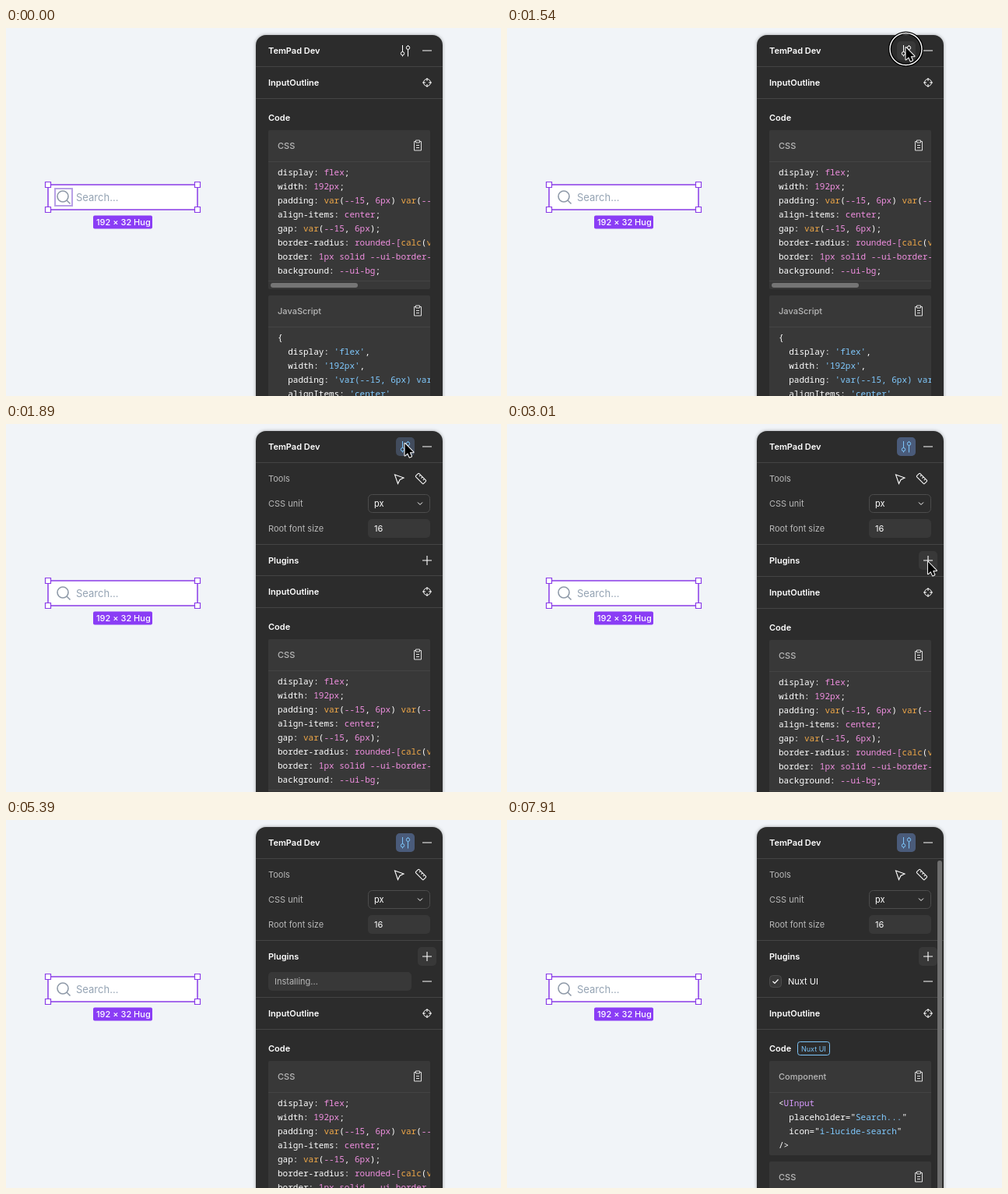
An HTML page with a canvas that plays this animation: 636 px wide and 472 px high, repeating every 8000 ms.

```html
<!DOCTYPE html>
<html lang="en">
<head>
<meta charset="utf-8">
<title>Plugin install</title>
<style>
html, body { margin: 0; width: 636px; height: 472px; overflow: hidden; background: #f1f4f8; }
canvas { display: block; }
</style>
</head>
<body>
<canvas id="stage" width="636" height="472"></canvas>
<script>
const ctx = document.getElementById('stage').getContext('2d');
const LOOP = 8000, STEP = 70;
const PANEL = '#2c2c2c', FIELD = '#383838', LINE = '#444', BLUE = '#7cc4f8', PURPLE = '#8a3ce8';
const MUTED = '#b8b8b8';

// Colour markers inside code lines
const INK = { '|': '#fff', '~': '#f08fe0', '^': '#f0a848', '$': '#80caff', '#': '#d99bff' };

const CSS_CODE = [
  'display: ~flex|;',
  'width: ~192px|;',
  'padding: ^var|(~--15|, ~6px|) ^var|(~--15|, ~6px|);',
  'align-items: ~center|;',
  'gap: ^var|(~--15|, ~6px|);',
  'border-radius: ~rounded-[^calc|(^var|(~--ui-radius|));',
  'border: ~1px solid --ui-border-accented|;',
  'background: ~--ui-bg|;'
];
const JS_CODE = [
  '{',
  "  display: $'flex'|,",
  "  width: $'192px'|,",
  "  padding: $'var(--15, 6px) var(--15, 6px)'|,",
  "  alignItems: $'center'|,"
];
const COMPONENT_CODE = ['<#UInput', '  placeholder="$Search...|"', '  icon="$i-lucide-search|"', '/>'];

const progress = (t, from, to) => Math.min(1, Math.max(0, (t - from) / (to - from)));
const ease = p => (1 - Math.cos(Math.PI * p)) / 2;
const mix = (a, b, p) => a + (b - a) * p;

function text(str, x, y, color = '#fff', weight = 400, size = 11) {
  ctx.font = `${weight} ${size}px Inter, sans-serif`;
  ctx.fillStyle = color;
  ctx.fillText(str, x, y);
}

function box(x, y, w, h, r, fill, stroke, width = 1) {
  ctx.beginPath();
  ctx.roundRect(x, y, w, h, r);
  if (fill) { ctx.fillStyle = fill; ctx.fill(); }
  if (stroke) { ctx.strokeStyle = stroke; ctx.lineWidth = width; ctx.stroke(); }
}

function path(d, color = '#fff', width = 1, x = 0, y = 0) {
  ctx.save();
  ctx.translate(x, y);
  ctx.strokeStyle = color;
  ctx.lineWidth = width;
  ctx.stroke(new Path2D(d));
  ctx.restore();
}

function circle(x, y, r, color, width = 1) {
  ctx.beginPath();
  ctx.arc(x, y, r, 0, 7);
  ctx.strokeStyle = color;
  ctx.lineWidth = width;
  ctx.stroke();
}

const rule = y => path(`M321 ${y + .5}H561`, LINE);
const minus = y => path(`M535 ${y + .5}H547`);

function codeLine(line, x, y) {
  ctx.font = '11px "Noto Sans Mono", "DejaVu Sans Mono", monospace';
  ctx.fillStyle = '#fff';
  for (const part of line.split(/(?=[|~^$#])/)) {
    const color = INK[part[0]];
    if (color) ctx.fillStyle = color;
    const run = color ? part.slice(1) : part;
    ctx.fillText(run, x, y);
    x += ctx.measureText(run).width;
  }
}

function card(title, lines, y, height) {
  ctx.save();
  ctx.beginPath();
  ctx.roundRect(337, y, 208, height, 2);
  ctx.clip();
  box(337, y, 208, height, 0, FIELD);
  text(title, 349, y + 24, MUTED, 500);
  path('M-2 -5H-4.5V6.5H4.5V-5H2M-2.5 -6.5H2.5V-3.5H-2.5ZM-2 0H2M-2 3H2', '#ddd', 1, 529, y + 19.5);
  path(`M337 ${y + 40.5}H545`, LINE);
  lines.forEach((line, i) => codeLine(line, 349, y + 58 + i * 18));
  ctx.restore();
}

function cssCards(y) {
  card('CSS', CSS_CODE, y, 204);
  path(`M337 ${y + 193.5}H545`, LINE);
  box(340, y + 196, 112, 6, 3, '#757575');
  card('JavaScript', JS_CODE, y + 212, 204);
}

function drawSelection(hovered) {
  box(54, 201, 192, 32, 0, '#fff', PURPLE, 1.5);
  circle(73, 216, 7, '#8e99a8', 1.6);
  path('M78 221L82.5 225.5', '#8e99a8', 1.6);
  if (hovered) box(63, 206, 22, 22, 0, null, '#b8a0e6', 2);
  text('Search...', 90, 222, '#94a3b3', 400, 13);
  for (const x of [54, 246]) for (const y of [201, 233]) box(x - 3.5, y - 3.5, 7, 7, 0, '#fff', PURPLE, 1.2);
  box(112, 240.5, 76, 17, 2, '#8a3df5');
  text('192 × 32 Hug', 116, 253, '#fff', 500);
}

function drawHeader(t) {
  text('TemPad Dev', 337, 33, '#fff', 600);
  const on = progress(t, 1800, 1960);
  if (t >= 1400) box(501, 17, 24, 24, 5, FIELD);
  ctx.globalAlpha = on;
  box(501, 17, 24, 24, 5, '#4a5b7a');
  ctx.globalAlpha = 1;
  const color = on ? BLUE : '#fff';
  path('M509.5 22V30.5M509.5 35V36.5M516.5 22V23M516.5 27.5V36.5', color);
  circle(509.5, 32.7, 2.2, color);
  circle(516.5, 25.3, 2.2, color);
  minus(28.5);
  rule(49);
}

function drawPluginRow(t) {
  if (t >= 7770) {
    box(337.5, 199.5, 15, 15, 4, FIELD, '#4c4c4c');
    path('M341.5 207L344 209.5L348.5 204.5', '#fff', 1.2);
    text('Nuxt UI', 361, 211);
  } else if (t >= 5320) {
    box(337, 195, 184, 24, 5, FIELD);
    text('Installing...', 345, 211, MUTED);
  } else {
    box(337.5, 195.5, 183, 23, 5, FIELD, '#3f94d6', 1.2);
    const typed = '@nuxt'.slice(0, [4060, 4340, 4550, 4690, 4970].filter(k => t >= k).length);
    text(typed, 345, 211);
    if (t < 3850 || t >= 4060) box(345 + ctx.measureText(typed).width, 200, 1, 14, 0, '#fff');
  }
  minus(206.5);
}

function drawSettings(t) {
  text('Tools', 337, 74, MUTED);
  path('M499.5 65L511 69L506 71.5L503.5 76.5Z', '#fff', 1.1);
  ctx.save();
  ctx.translate(533, 70);
  ctx.rotate(Math.PI / 4);
  box(-7, -3, 14, 6, 1, null, '#fff');
  path('M-3.5 -3V-.5M0 -3V-.5M3.5 -3V-.5');
  ctx.restore();
  text('CSS unit', 337, 106, MUTED);
  box(465.5, 90.5, 79, 23, 5, null, '#4c4c4c');
  text('px', 473, 106);
  path('M529 100.5L532 103.5L535 100.5');
  text('Root font size', 337, 138, MUTED);
  box(465, 122, 80, 24, 5, FIELD);
  text('16', 473, 138);
  rule(154);
  text('Plugins', 337, 179, '#fff', 600);
  if (t >= 2870) box(529, 163, 24, 24, 5, FIELD);
  path('M535 175H547M541 169V181', '#fff', 1.1);
  if (t >= 3220) drawPluginRow(t);
}

function drawInspector(t, shift) {
  box(321, 49 + shift, 240, 500, 0, PANEL);
  rule(49 + shift);
  text('InputOutline', 337, 74 + shift, '#fff', 600);
  circle(541, 70 + shift, 4.5, '#fff');
  path('M535 0H539M543 0H547M541 -6V-2M541 2V6', '#fff', 1, 0, 70 + shift);
  rule(90 + shift);
  text('Code', 337, 119 + shift, '#fff', 600);
  const top = 131 + shift;
  if (t < 7770) return cssCards(top);
  box(373.5, 284.5, 41, 17, 3, null, BLUE);
  text('Nuxt UI', 378, 296.5, BLUE, 400, 9);
  card('Component', COMPONENT_CODE, top, 121);
  cssCards(top + 129);
}

function drawPanel(t) {
  const shift = Math.round(146 * ease(progress(t, 1680, 1900)) + 32 * ease(progress(t, 3220, 3350)));
  ctx.save();
  ctx.shadowColor = 'rgba(0,0,0,.35)';
  ctx.shadowBlur = 4;
  box(321, 9, 240, 500, 13, PANEL);
  ctx.restore();
  ctx.save();
  ctx.beginPath();
  ctx.roundRect(321, 9, 240, 500, 13);
  ctx.clip();
  if (shift) drawSettings(t);
  drawInspector(t, shift);
  drawHeader(t);
  ctx.globalAlpha = progress(t, 7700, 7910);
  box(553, 52, 6, 440, 3, '#6e6e6e');
  ctx.restore();
}

function drawPointer(t) {
  if (t < 700 || t >= 4060) return;
  const enter = ease(progress(t, 630, 1470)), down = ease(progress(t, 2310, 3080));
  const x = mix(mix(622, 512.5, enter), 541.5, down);
  const y = mix(mix(215, 25, enter), 180, down);
  if ((t >= 1540 && t < 1680) || (t >= 3220 && t < 3360)) {
    circle(x, y + 2, 20.5, '#000', 4);
    circle(x, y + 2, 20.5, '#fff', 1.4);
  }
  ctx.save();
  ctx.translate(x, y);
  const arrow = new Path2D('M0 0V15.5L3.6 12.2L6 17.6L8.5 16.5L6.2 11.2H11Z');
  ctx.lineJoin = 'round';
  ctx.strokeStyle = '#fff';
  ctx.lineWidth = 2;
  ctx.stroke(arrow);
  ctx.fillStyle = '#000';
  ctx.fill(arrow);
  ctx.restore();
}

function draw() {
  const t = Math.floor(performance.now() % LOOP / STEP) * STEP;
  ctx.fillStyle = '#f1f4f8';
  ctx.fillRect(0, 0, 636, 472);
  drawSelection(t < 700);
  drawPanel(t);
  drawPointer(t);
  requestAnimationFrame(draw);
}
draw();
</script>
</body>
</html>
```
